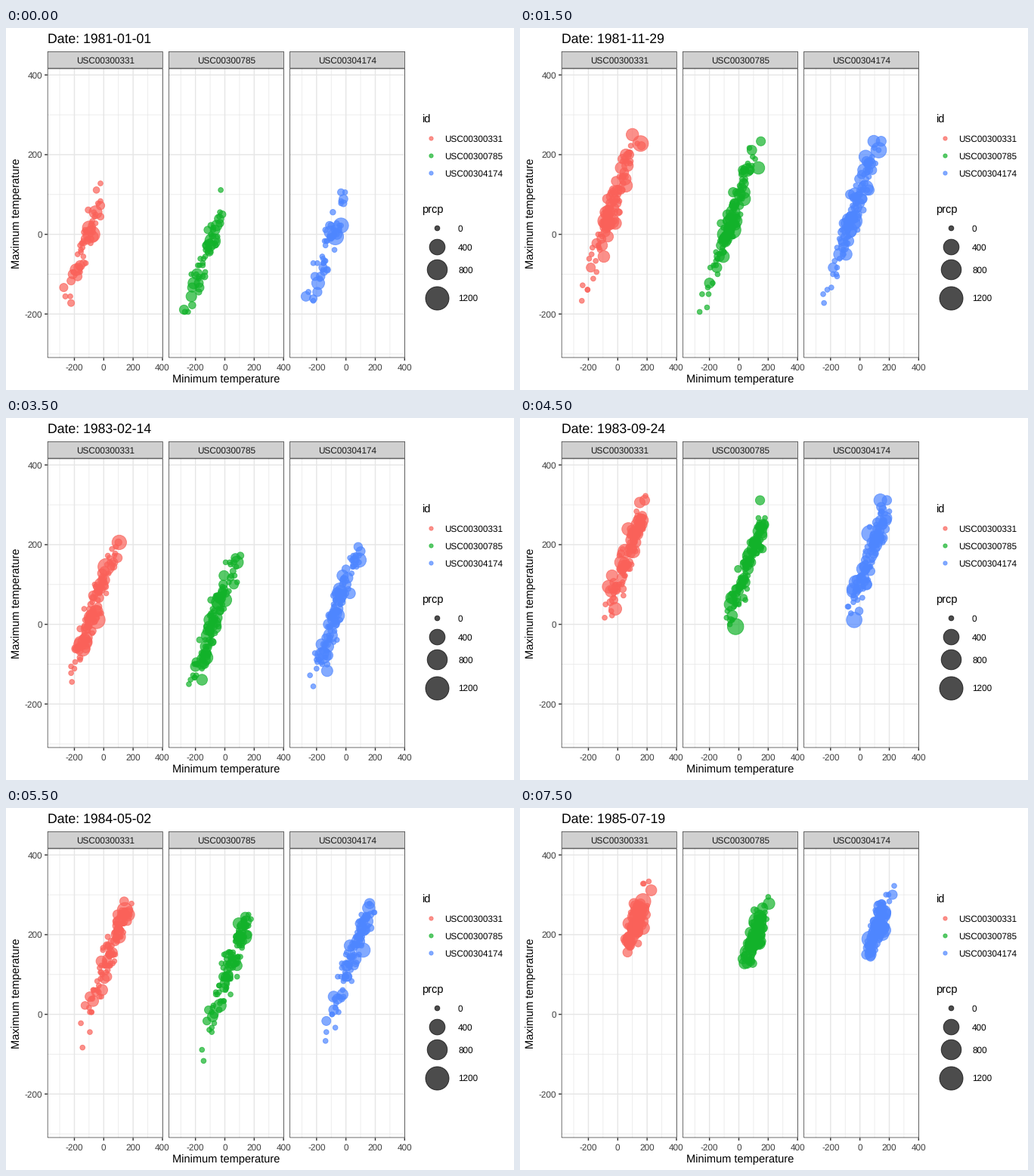
Recreate the animation shown at these times as a matplotlib script. Size 672x480 px, loop 8000 ms.

```python
import numpy as np
import matplotlib.pyplot as plt
from matplotlib.animation import FuncAnimation
from matplotlib.patches import Rectangle

W, H, DPI = 672, 480, 96
FRAMES, INTERVAL = 16, 500
STATIONS = ["USC00300331", "USC00300785", "USC00304174"]
COLORS = ["#FA6159", "#12B22A", "#4E86FF"]
LEFT, PANEL_W, STEP = 54.8, 152.84, 160.18
STRIP_TOP, TOP, BOTTOM = 31.0, 53.6, 437.3
ALPHA, STROKE = 0.7, 0.945
DARK, TICK_TEXT = "#333333", "#404040"

plt.rcParams["font.family"] = "Liberation Sans"
plt.rcParams["text.hinting"] = "none"
fig = plt.figure(figsize=(W / DPI, H / DPI), dpi=DPI, facecolor="white")
ax = fig.add_axes([0, 0, 1, 1])
ax.set_xlim(0, W)
ax.set_ylim(H, 0)
ax.axis("off")


def tmin_x(panel, v):
    return LEFT + STEP * panel + 74.5 + 0.1942 * v


def tmax_y(v):
    return 273.6 - 0.5283 * v


def line(xs, ys, color, width, z):
    ax.plot(xs, ys, color=color, lw=width * 0.75, zorder=z, snap=False,
            solid_capstyle="butt")


def box(x, top, bottom, fill, z):
    inset = 0.35
    ax.add_patch(Rectangle((x + inset, top + inset), PANEL_W - 2 * inset,
                           bottom - top - 2 * inset, fc=fill, ec=DARK,
                           lw=0.53, zorder=z, snap=False))


def label(x, y, text, size=8.8, color="black", **kw):
    return ax.text(x, y, text, fontsize=size, color=color, va="baseline",
                   zorder=6, **kw)


def point_size(prcp):
    return 2 + 0.2477 * np.sqrt(prcp)


def area(size):
    """Marker area in square points for a point size in mm."""
    return ((2.845 * np.asarray(size) + STROKE) * 0.75) ** 2


def dots(x, y, size, color):
    return ax.scatter([x], [y], s=area([size]), facecolor=color,
                      edgecolor=color, alpha=ALPHA, lw=STROKE * 0.75,
                      zorder=4)


def draw_panel(i):
    left = LEFT + STEP * i
    for v in range(-300, 401, 100):
        major = v % 200 == 0
        width = 1.42 if major else 0.71
        x, y = tmin_x(i, v), tmax_y(v)
        line([x, x], [TOP, BOTTOM], "#E6E6E6", width, 1)
        line([left, left + PANEL_W], [y, y], "#E6E6E6", width, 1)
        if major:
            line([x, x], [BOTTOM, BOTTOM + 3.67], DARK, 1.42, 2)
            label(x, 453.4, str(v), color=TICK_TEXT, ha="center")
    box(left, STRIP_TOP, TOP, "#D0D0D0", 3)
    box(left, TOP, BOTTOM, "none", 5)
    label(left + PANEL_W / 2, 46.8, STATIONS[i], color="#1A1A1A", ha="center")


def draw_legend():
    label(550, 126, "id", 11)
    for i, name in enumerate(STATIONS):
        y = 146.2 + 23.04 * i
        dots(561.6, y, 1.5, COLORS[i])
        label(580.37, y + 4.3, name)
    label(550, 245, "prcp", 11)
    for prcp, y in ((0, 265.4), (400, 290.2), (800, 320.3), (1200, 358)):
        dots(570.4, y, point_size(prcp), "black")
        label(598, y + 4.3, str(prcp))


for i in range(3):
    draw_panel(i)
for v in range(-200, 401, 200):
    line([LEFT - 3.67, LEFT], [tmax_y(v)] * 2, DARK, 1.42, 2)
    label(48.2, tmax_y(v) + 4.2, str(v), color=TICK_TEXT, ha="right")
label(291.3, 470, "Minimum temperature", 11, ha="center")
label(17.5, 245.5, "Maximum temperature", 11, ha="center", rotation=90,
      rotation_mode="anchor")
draw_legend()
title = label(54.8, 20.3, "", 13.2)

# Daily weather in tenths of a degree: a yearly wave plus spells of warm and
# cold days, shared by the three stations and wider in winter.
START = np.datetime64("1981-01-01")
DAYS_PER_FRAME, HALF_WINDOW, WARMEST_DAY = 110.64, 55, 204
rng = np.random.default_rng(1981)
days = np.arange(int(DAYS_PER_FRAME * FRAMES) + HALF_WINDOW)
wave = np.cos(2 * np.pi * (days - WARMEST_DAY) / 365.25)


def spells(n, memory=0.6):
    kicks = rng.normal(size=n) * np.sqrt(1 - memory ** 2)
    out = np.zeros(n)
    for k in range(1, n):
        out[k] = memory * out[k - 1] + kicks[k]
    return np.clip(out, -2.3, 2.3)


def noise(scale):
    return scale * np.clip(rng.normal(size=days.size), -2, 2)


def fahrenheit_grid(v):
    return np.round(v / 5.56) * 5.56


def station(tmin_shift, tmax_shift):
    """Minimum, maximum and rainfall for every day at one station."""
    swing = 47 - 18 * wave
    tmin = 22 + 120 * wave + swing * warmth + muggy + noise(9) + tmin_shift
    tmax = 130 + 122 * wave + 1.15 * swing * warmth + noise(14) + tmax_shift
    prcp = np.where(wet, storm * rng.uniform(0.3, 1.5, days.size), 0)
    return fahrenheit_grid(tmin), fahrenheit_grid(tmax), prcp


warmth = spells(days.size)
muggy = noise(20)
wet = rng.random(days.size) < 0.45
storm = rng.exponential(95, days.size)
weather = [station(0, 0), station(-8, -30), station(2, -8)]
layers = [dots(0, 0, 2, c) for c in COLORS]


def update(step):
    today = int(round(DAYS_PER_FRAME * step))
    title.set_text(f"Date: {START + today}")
    near = np.abs(days - today) <= HALF_WINDOW
    for i, (layer, (tmin, tmax, prcp)) in enumerate(zip(layers, weather)):
        layer.set_offsets(np.column_stack([tmin_x(i, tmin[near]),
                                           tmax_y(tmax[near])]))
        layer.set_sizes(area(point_size(prcp[near])))
    return [title, *layers]


anim = FuncAnimation(fig, update, frames=FRAMES, interval=INTERVAL,
                     repeat=True, repeat_delay=0, blit=False)
plt.show()
```
